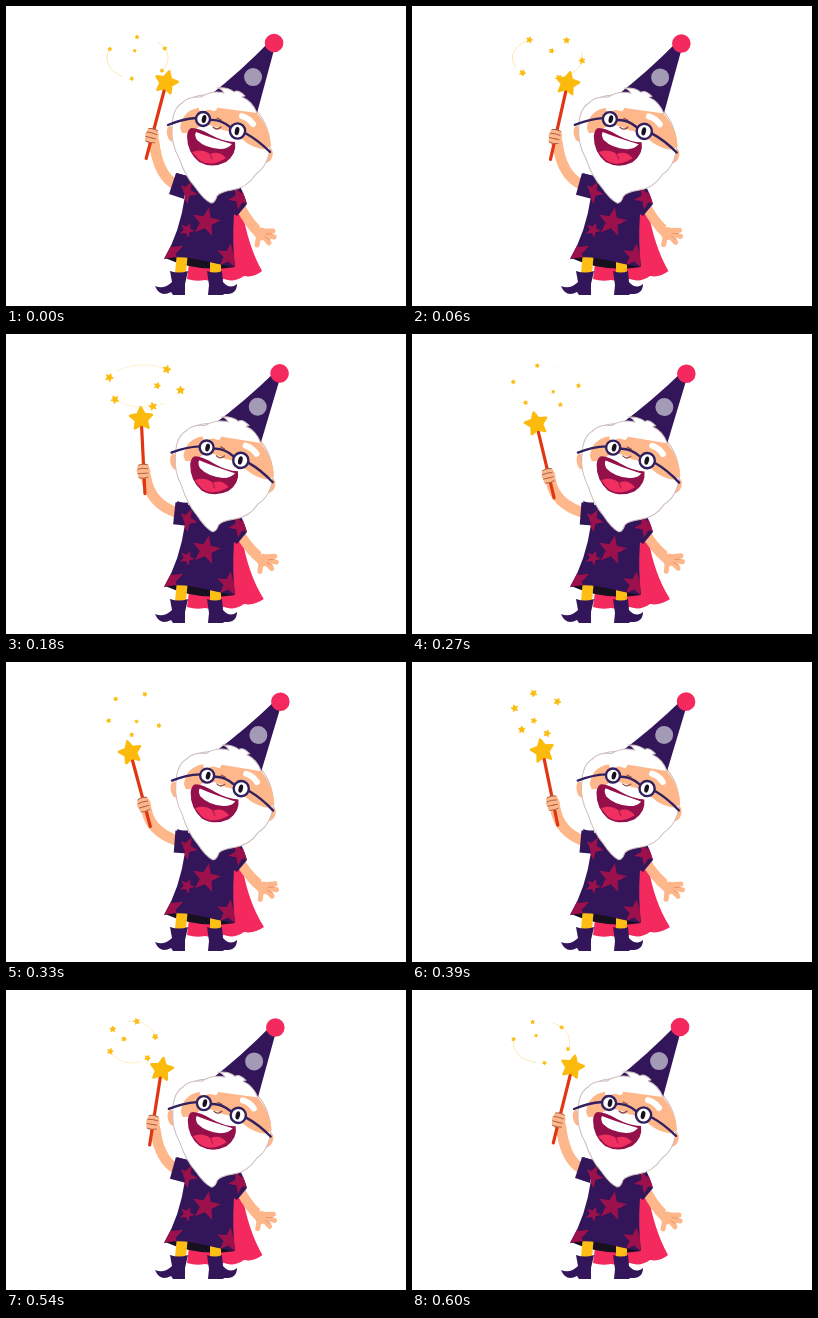
Write an HTML page that moves like this. It is 400 px wide and 300 px high and loops after 0.63 s.

```html
<!DOCTYPE html>
<html lang="en">
<head>
<meta charset="utf-8">
<title>Wizard with a wand</title>
<style>
html, body { margin: 0; width: 100%; height: 100%; overflow: hidden; background: #fff; }
svg { display: block; width: 100vw; height: 100vh; }
.skin { fill: #fdb78a; }
.line { fill: none; stroke-linecap: round; stroke-linejoin: round; }
.flesh { stroke: #fdb78a; }
.hair { fill: #fff; stroke: #cdbcc0; stroke-width: 1; stroke-linejoin: round; }
.gold { fill: #fcba0c; stroke: #fcba0c; stroke-linejoin: round; }
.dark { fill: #33155a; }
</style>
</head>
<body>
<svg viewBox="0 0 400 300">
  <defs>
    <clipPath id="cut"><use href="#robe"/></clipPath>
  </defs>

  <path id="cape" fill="#f42a5e"/>

  <g id="armR">
    <path class="skin" d="M230 203L238 197Q244 210 254 220L249 230Q240 222 230 203Z"/>
    <ellipse class="skin" cx="255" cy="228" rx="6.5" ry="6.5"/>
    <path class="line flesh" stroke-width="5" d="M253 229L251 239M257 225L267 225M257 228L268 231M257 230L263 237"/>
    <path class="line" stroke="#e58a63" stroke-width=".8" d="M260 228L266 228M259 231L264 234"/>
  </g>

  <path fill="#17101f" d="M159 252L172 245L226 252L229 261Q192 267 159 252Z"/>
  <path fill="#fdbf16" d="M171 246H182L180 267H169ZM204 252H215V267H204Z"/>
  <path class="dark" d="M164 265Q173 268 182 265L179 278V289H167L165 286Q154 292 149 280Q158 284 166 276Z"/>
  <path class="dark" d="M201 265Q209 268 216 265L217 276Q224 284 231 278Q231 289 218 288L217 289H202L203 279Z"/>

  <path id="armL" class="line flesh" stroke-width="10.5"/>
  <path id="sleeve" class="dark" d="M170 167L182 170L178 193L163 188Z"/>
  <path id="robe" class="dark" d="M171 167Q200 178 230 174Q237 184 241 198L231 210L228 208Q226 236 229 261C205 258 180 247 158 253Q174 226 179 190Z"/>
  <g id="marks" clip-path="url(#cut)" fill="#9c114c"></g>

  <g id="head">
    <ellipse class="skin" cx="165" cy="128" rx="4" ry="8" transform="rotate(-12 165 128)"/>
    <ellipse class="skin" cx="261" cy="149" rx="5.5" ry="8" transform="rotate(18 261 149)"/>
    <path class="hair" d="M166 122Q166 103 176 97Q188 89 199 89Q224 90 250 104Q264 120 264 141Q262 160 250 168Q241 182 226 184Q214 186 211 190Q209 197 205 197Q198 194 189 181Q179 170 173 152Q165 138 166 122Z"/>
    <path class="skin" d="M174 122Q176 105 192 102Q214 98 226 99Q242 100 251 107Q264 122 265 140Q260 145 252 142Q244 140 237 134Q228 125 216 124Q204 117 194 120Q184 128 176 127Z"/>
    <path class="dark" d="M203 90Q234 66 264 35L269 40L251 107Q228 90 203 90Z"/>
    <circle cx="247" cy="71" r="9" fill="#a39ab5"/>
    <circle cx="268" cy="37" r="9.3" fill="#f42a5e"/>
    <path class="hair" d="M176 97Q182 90 195 91Q206 84 218 87Q215 82 211 82Q222 81 228 86Q232 83 239 90Q237 90 236 91Q246 95 251 107"/>
    <path class="line" stroke="#fff" stroke-width="6" d="M196 103Q202 99 208 102M236 110Q243 112 247 118"/>
    <path fill="#94104a" d="M186 122Q193 122 205 129Q218 136 229 136Q231 148 220 156Q206 163 193 156Q181 146 181 130Q182 122 186 122Z"/>
    <path fill="#fff" d="M190 126Q205 132 226 138Q222 143 214 143Q199 142 191 134Q188 129 190 126Z"/>
    <path fill="#ee2f60" d="M186 146Q196 142 204 148Q213 144 220 152Q205 162 193 154Z"/>
    <path class="line" stroke="#a8174b" stroke-width="1" d="M204 148L206 153"/>
    <path class="line" stroke="#8c4a48" stroke-width="1.2" d="M207 121Q211 125 215 121M211 112L215 114"/>
    <g class="line" stroke="#32205f" stroke-width="2.4">
      <path d="M162 119Q176 113 190 112M204 114Q214 113 224 121M239 127Q252 134 264 146"/>
      <circle cx="197" cy="113" r="7" fill="#fff"/>
      <circle cx="231.500" cy="125" r="7.600" fill="#fff"/>
    </g>
    <g fill="#17101f">
      <ellipse cx="198" cy="113" rx="2.2" ry="4" transform="rotate(12 198 113)"/>
      <ellipse cx="231" cy="125" rx="2.2" ry="4.2" transform="rotate(12 231 125)"/>
    </g>
  </g>

  <path id="trail" class="line" stroke="#fbe3a0" stroke-width="1"/>
  <ellipse id="palm" class="skin" rx="6.500" ry="8.500"/>
  <path id="rod" class="line" stroke="#e23613" stroke-width="3.2"/>
  <path id="tip" class="gold" stroke-width="2.500"/>
  <g id="grip">
    <path class="line flesh" stroke-width="4.600" d="M-4 -5L3 -5M-5 -1H3M-4 4H3"/>
    <path class="line" stroke="#a85f4a" stroke-width=".9" d="M-6 -3Q-1 -4 4 -3M-6 1.500H4M-5 6Q0 7 4 5.500M-5 -7Q-1 -9 4 -7"/>
  </g>
  <path id="sparks" class="gold" stroke-width=".8"/>
</svg>
<script>
const LOOP = 630, STEP = 30, TAU = 2 * Math.PI, SPARKS = 5;

const $ = id => document.getElementById(id);
const set = (id, name, value) => $(id).setAttribute(name, value);
const mix = (a, b, k) => a + (b - a) * k;
// One swing per loop, at its peak when t equals the given time.
const wave = (t, peak) => Math.cos(TAU * (t - peak) / LOOP);

function star(x, y, r, turn = 0, inner = .48) {
  let d = "";
  for (let n = 0; n < 10; n++) {
    const a = turn + n * TAU / 10, q = n % 2 ? r * inner : r;
    d += (n ? "L" : "M") + (x + q * Math.sin(a)).toFixed(2) + " " + (y - q * Math.cos(a)).toFixed(2);
  }
  return d + "Z";
}

const marks = [[200, 216, 15], [180, 186, 12], [234, 192, 12], [163, 247, 16], [223, 250, 13], [181, 224, 8]];
$("marks").innerHTML = marks.map(([x, y, r], n) => `<path d="${star(x, y, r, .2 + n * .3, .42)}"/>`).join("");

// Sparks circle clockwise on an ellipse that leans towards the wand's far side.
function orbit(t, degrees, scale = 1) {
  const a = degrees * TAU / 360 + TAU * t / LOOP, lean = wave(t, 150);
  return [131 + 7 * lean + (30 + 8 * lean) * scale * Math.cos(a), 52 + 21 * scale * Math.sin(a)];
}

function drawSparks(t) {
  const size = 3.3 + 1.3 * Math.cos(2 * TAU * (t - 140) / LOOP);
  let d = star(...orbit(t, 255, .36), size * .8, .3);
  for (let n = 0; n < SPARKS; n++) d += star(...orbit(t, 205 + 64 * n), size, .25 + n);
  set("sparks", "d", d);

  const tail = lead => {
    const points = [];
    for (let back = 85; back >= 5; back -= 8) points.push(orbit(t, lead - back).join(" "));
    return "M" + points.join("L");
  };
  set("trail", "d", tail(205) + tail(397));
  set("trail", "opacity", .45 + .4 * wave(t, 30));
}

function draw(t) {
  const swing = wave(t, -15), drop = wave(t, 5);
  const s = Math.sin(Math.PI / 4 * (1 - swing));

  set("head", "transform", `translate(${2 * s} ${.8 * s}) rotate(${1.7 * s} 205 185)`);
  set("sleeve", "transform", `rotate(${-14 * s} 176 170)`);
  set("armR", "transform", `rotate(${-5 * s} 232 200)`);
  set("cape", "d", `M224 196L236 203Q242 240 ${256 + 2 * s} 265Q248 272 238 270Q228 277 218 273Q206 276 199 274Q190 276 181 273L184 250Z`);

  const tipX = 142 + 18.5 * swing, tipY = 83.5 - 7 * drop;
  const endX = 142 - 4 * wave(t, 110), endY = 158.5 - 6 * drop;
  const handX = mix(endX, tipX, .29), handY = mix(endY, tipY, .29);
  const turn = Math.atan2(tipX - endX, endY - tipY);
  const place = `translate(${handX} ${handY}) rotate(${turn * 360 / TAU})`;
  set("palm", "transform", place);
  set("grip", "transform", place);
  set("rod", "d", `M${endX} ${endY}L${tipX} ${tipY}`);
  set("tip", "d", star(tipX, tipY, 11.5, turn, .5));
  set("armL", "d", `M${handX + 2} ${handY + 5}Q${handX + 6} 170 ${170 + 2 * s} 179`);
  drawSparks(t);
}

const start = performance.now();
function tick(now) {
  const t = Math.max(0, now - start) % LOOP;
  draw(Math.floor(t / STEP) * STEP);
  requestAnimationFrame(tick);
}
draw(0);
requestAnimationFrame(tick);
</script>
</body>
</html>
```
